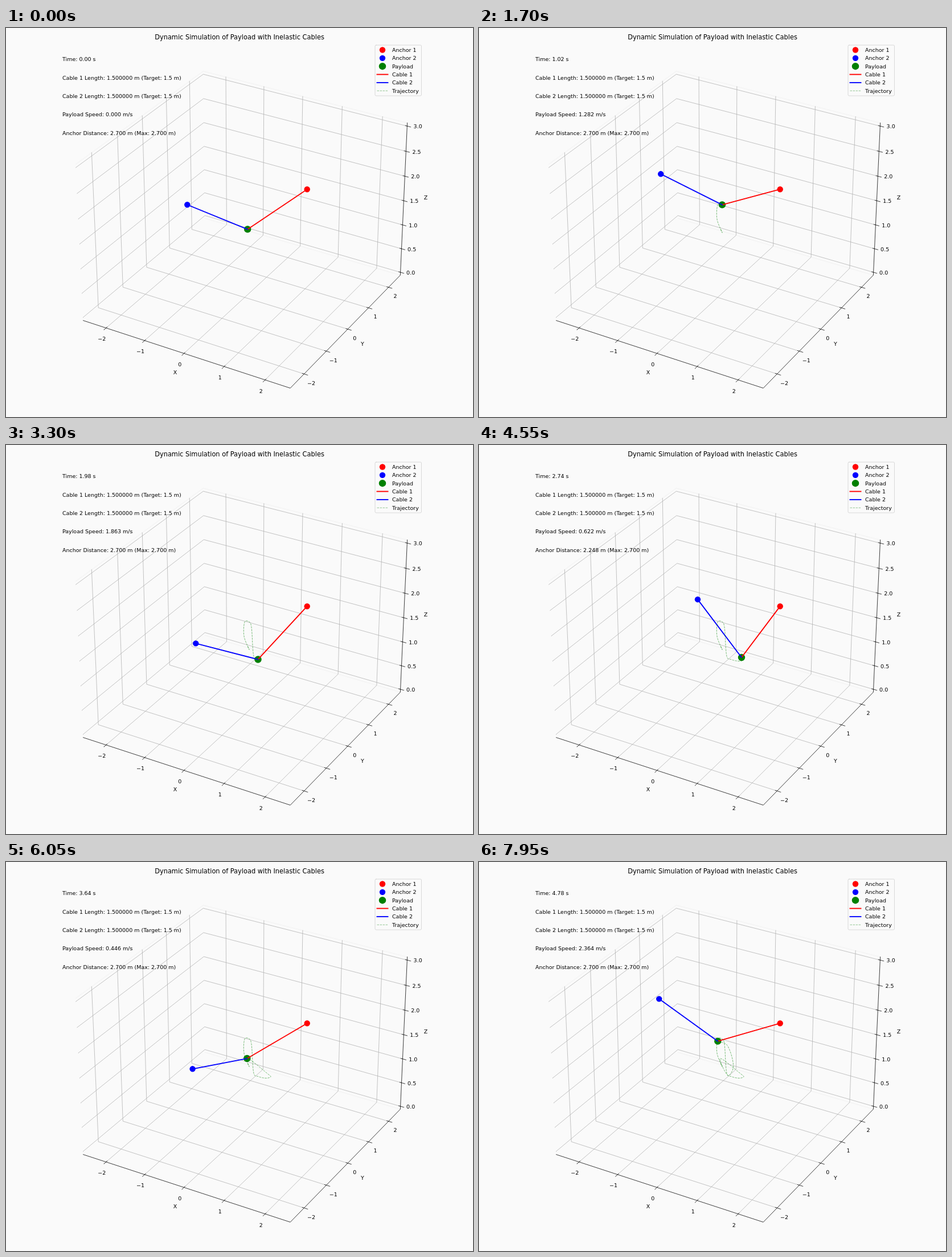
An HTML page with a canvas that plays this animation: 820x683 px, repeating every 8 s.

```html
<!DOCTYPE html>
<html lang="en">
<head>
<meta charset="utf-8">
<title>Payload simulation</title>
<style>
  html, body { margin: 0; width: 100%; height: 100%; overflow: hidden; background: #fafafa; }
  canvas { display: block; }
</style>
</head>
<body>
<canvas id="stage" width="820" height="683"></canvas>
<script>
const ctx = document.getElementById('stage').getContext('2d');
const FRAME_MS = 50, FRAMES = 160, STEP = 15 / 499;
const PT = 0.949;                       // pixels per typographic point
const L = 2.5 * 25 / 24, Z_MIN = -0.0625, Z_MAX = 3.0625;
const BACKGROUND = '#fafafa', GRID = '#b0b0b0', EDGE = '#eeeeee';
const anchor1 = [528.7, 283.2];

// Key poses: seconds, anchor 2 x and y, payload speed.
const anchorKeys = [
  [0, 318.3, 310.3, 0], [0.55, 326, 234, 1.5], [1.022, 319.2, 256.3, 1.282], [1.984, 333.3, 348.4, 1.863],
  [2.736, 384, 271.2, 0.622], [3.637, 327.6, 363.3, 0.446], [4.299, 334.6, 316.6, 1.995], [4.78, 316.2, 240.3, 2.364]
];
// Turning points of the payload: seconds, x, y.
const payloadKeys = [
  [0, 424.2, 353.4], [0.2, 427, 359], [0.5, 418, 336], [0.8, 419, 311], [1.022, 427, 310.4],
  [1.25, 431, 320], [1.75, 435, 371], [1.984, 442.5, 376.5], [2.4, 457, 379.5], [2.62, 465, 377],
  [2.736, 461, 373], [3.637, 423.3, 345], [4.1, 437.5, 375], [4.299, 446.7, 358.5],
  [4.6, 436, 322], [4.78, 419.2, 314.6]
];

// Smooth curve through the keys, with finite-difference tangents.
function sample(keys, t) {
  let i = 0;
  while (i < keys.length - 2 && t > keys[i + 1][0]) i++;
  const a = keys[i], b = keys[i + 1], h = b[0] - a[0];
  const before = keys[i - 1] || a, after = keys[i + 2] || b;
  const u = Math.min(1, (t - a[0]) / h);
  return a.map((value, c) => {
    const slopeA = (b[c] - before[c]) / (b[0] - before[0]);
    const slopeB = (after[c] - a[c]) / (after[0] - a[0]);
    return value * (1 + 2 * u) * (1 - u) ** 2 + b[c] * u * u * (3 - 2 * u)
      + h * u * (1 - u) * (slopeA * (1 - u) - slopeB * u);
  }).slice(1);
}

// The anchors stay at full reach, apart from one approach.
const anchorDistance = t => 2.7 - 0.452 * Math.exp(-(((t - 2.7355) / 0.2) ** 2));

// Perspective camera: elevation 30°, azimuth −60°, distance 10.
function project([x, y, z]) {
  const X = x * 0.22857, Y = y * 0.22857, Z = (z - 1.5) * 0.28571;
  const scale = 3500 / (10 - (0.433 * X - 0.75 * Y + 0.5 * Z));
  return [
    419.05 + scale * (0.866 * X + 0.5 * Y),
    340.7 - scale * (-0.25 * X + 0.433 * Y + 0.866 * Z)
  ];
}

function line(points, color, width) {
  ctx.strokeStyle = color;
  ctx.lineWidth = width;
  ctx.beginPath();
  points.forEach(p => ctx.lineTo(...p));
  ctx.stroke();
}
const line3d = (color, ...points) => line(points.map(project), color, 0.8 * PT);

function dot([x, y], radius, color) {
  ctx.fillStyle = color;
  ctx.beginPath();
  ctx.arc(x, y, radius, 0, 2 * Math.PI);
  ctx.fill();
}

function text(string, x, y, align = 'left', size = 10) {
  ctx.font = `${size * PT}px "DejaVu Sans", sans-serif`;
  ctx.textAlign = align;
  ctx.fillStyle = '#000';
  ctx.fillText(string, x, y + size * 0.35);
}

function dashed(points, alpha) {
  ctx.save();
  ctx.globalAlpha = alpha;
  ctx.lineCap = 'butt';
  ctx.setLineDash([3.7 * PT, 1.6 * PT]);
  line(points, 'green', PT);
  ctx.restore();
}

// A tick with its label; at(d) is the point d units outside the axis.
function tickMark(label, at) {
  line3d('#000', at(L / 30), at(-L / 60));
  const [x, y, z] = at(0.175);
  const [labelX, labelY] = project([x, y, z]);
  text(label, labelX, labelY + 3, 'center');
}

function drawAxes() {
  line3d(EDGE, [-L, -L, Z_MAX], [-L, L, Z_MAX], [L, L, Z_MAX]);
  line3d(EDGE, [-L, L, Z_MIN], [L, L, Z_MIN]);
  for (let v = -2; v <= 2; v++) {
    line3d(GRID, [v, -L, Z_MIN], [v, L, Z_MIN], [v, L, Z_MAX]);
    line3d(GRID, [L, v, Z_MIN], [-L, v, Z_MIN], [-L, v, Z_MAX]);
  }
  for (let z = 0; z <= 3; z += 0.5) line3d(GRID, [-L, -L, z], [-L, L, z], [L, L, z]);

  line3d('#000', [-L, -L, Z_MIN], [L, -L, Z_MIN], [L, L, Z_MIN], [L, L, Z_MAX]);

  // Labels sit below the floor as well as outside it; ticks stay on it.
  const drop = d => Z_MIN - (d > 0.1 ? 0.6 * d : 0);
  const side = d => L + (d > 0.1 ? d : 0);
  for (let v = -2; v <= 2; v++) {
    const label = String(v).replace('-', '\u2212');
    tickMark(label, d => [v, -L - d, drop(d)]);
    tickMark(label, d => [L + d, v, drop(d)]);
  }
  for (let z = 0; z <= 3; z += 0.5) tickMark(z.toFixed(1), d => [L + d, side(d), z]);

  text('X', 297, 604, 'center');
  text('Y', 626, 554, 'center');
  text('Z', 737, 297.5, 'center');
}

function drawLegend() {
  ctx.fillStyle = BACKGROUND;
  ctx.strokeStyle = '#d6d6d6';
  ctx.lineWidth = PT;
  ctx.beginPath();
  ctx.roundRect(648, 30, 81.5, 89, 2);
  ctx.fill();
  ctx.stroke();
  const row = i => 38.5 + i * 14.35;
  const bar = i => [[651.5, row(i)], [670.5, row(i)]];
  dot([661, row(0)], 5.2, 'red');
  dot([661, row(1)], 5.2, 'blue');
  dot([661, row(2)], 6.2, 'green');
  line(bar(3), 'red', 2 * PT);
  line(bar(4), 'blue', 2 * PT);
  dashed(bar(5), 0.45);
  ['Anchor 1', 'Anchor 2', 'Payload', 'Cable 1', 'Cable 2', 'Trajectory']
    .forEach((name, i) => text(name, 678, row(i)));
}

function drawFrame(frame) {
  const t = frame * STEP;
  const [x, y, speed] = sample(anchorKeys, t);
  const anchor2 = [x, y], payload = sample(payloadKeys, t);
  ctx.fillStyle = BACKGROUND;
  ctx.fillRect(0, 0, 820, 683);
  ctx.lineCap = 'square';
  drawAxes();

  dot(anchor1, 5.2, 'red');
  dot(anchor2, 5.2, 'blue');
  dot(payload, 6.2, 'green');
  line([anchor1, payload], 'red', 2 * PT);
  line([anchor2, payload], 'blue', 2 * PT);
  dashed(Array.from({ length: frame + 1 }, (_, i) => sample(payloadKeys, i * STEP)), 0.55);

  text('Dynamic Simulation of Payload with Inelastic Cables', 410, 16, 'center', 12);
  [
    `Time: ${t.toFixed(2)} s`,
    'Cable 1 Length: 1.500000 m (Target: 1.5 m)',
    'Cable 2 Length: 1.500000 m (Target: 1.5 m)',
    `Payload Speed: ${speed.toFixed(3)} m/s`,
    `Anchor Distance: ${anchorDistance(t).toFixed(3)} m (Max: 2.700 m)`
  ].forEach((string, i) => text(string, 99, 54.65 + i * 32.35));
  drawLegend();
}

const start = performance.now();
function animate() {
  drawFrame(Math.floor((performance.now() - start) / FRAME_MS) % FRAMES);
  requestAnimationFrame(animate);
}
animate();
</script>
</body>
</html>
```
